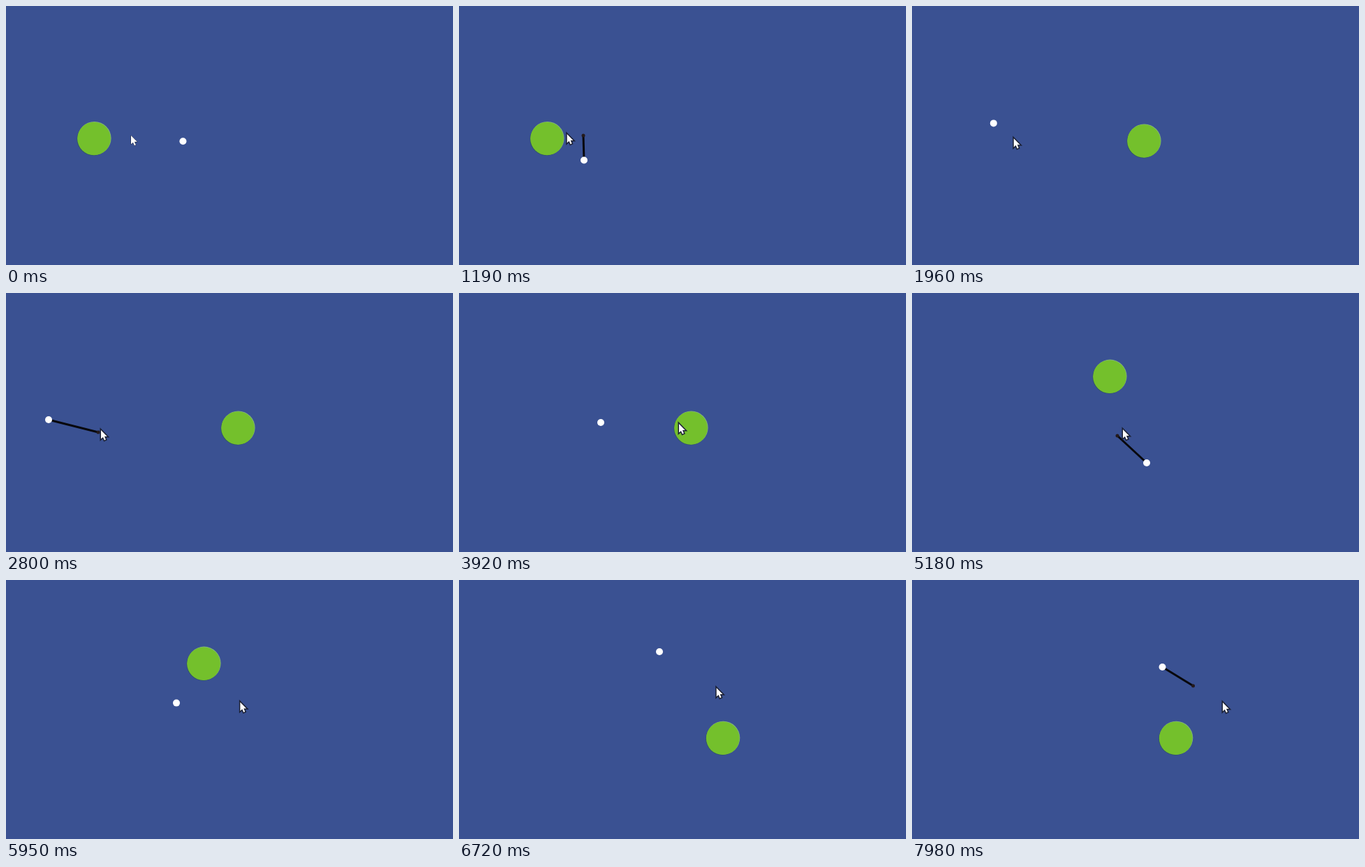
These frames come from a looping animation (640 by 372 pixels, 8 s). An HTML page with a canvas:

```html
<!DOCTYPE html>
<html lang="en">
<head>
<meta charset="utf-8">
<title>Swing ball</title>
<style>
  html, body { margin: 0; width: 100%; height: 100%; overflow: hidden; background: #3a5192; }
  canvas { display: block; }
</style>
</head>
<body>
<canvas id="stage" width="640" height="372"></canvas>
<script>
const ctx = document.getElementById('stage').getContext('2d');
const LOOP = 8000, STEP = 70;
const GRAVITY = 1.115e-4; // px per ms²

const key = (t, x, y, rope) => ({ t, x, y, rope });
const point = (x, y) => ({ x, y });
const first = point(178, 186), second = point(132, 200),
      third = point(294, 205), fourth = point(402.5, 152);

// Each key starts a leg: a swing when it names a rope's anchor, else free flight.
const ballKeys = [
  key(0, 253.4, 194.2),
  key(840, 214, 228, first), key(1190, 179, 221.5, first),
  key(1400, 154, 203),
  key(2800, 61, 182, second),
  key(3560, 144, 229),
  key(3920, 203, 186),
  key(4300, 265.5, 155.5, third), key(5180, 336, 244, third),
  key(5950, 244, 176.6),
  key(6720, 287, 103),
  key(7700, 342.6, 105, fourth), key(7980, 358.5, 125, fourth)
];
const cursorKeys = [
  key(0, 179, 186), key(840, 178, 186), key(1190, 154.7, 184),
  key(2800, 136, 197), key(3920, 315, 188), key(5180, 302, 196),
  key(6720, 368.7, 155), key(7980, 445, 176)
];
const goals = [
  key(0, 126, 190.5), key(1470, 332, 194), key(4690, 283, 120.2), key(6230, 377.7, 227.3)
];

const mix = (a, b, u) => a + (b - a) * u;
const latest = (keys, t) => keys.findLastIndex(k => k.t <= t);

// Angle and distance from the anchor both change evenly.
function swing(a, b, u) {
  const polar = p => [Math.atan2(p.y - a.rope.y, p.x - a.rope.x),
                      Math.hypot(p.x - a.rope.x, p.y - a.rope.y)];
  const [from, r0] = polar(a), [to, r1] = polar(b);
  const turn = Math.atan2(Math.sin(to - from), Math.cos(to - from));
  const angle = from + turn * u, r = mix(r0, r1, u);
  return point(a.rope.x + r * Math.cos(angle), a.rope.y + r * Math.sin(angle));
}

function pointAt(keys, t, gravity = 0) {
  const i = latest(keys, t), a = keys[i], b = keys[i + 1];
  if (!b) return a;
  const u = (t - a.t) / (b.t - a.t);
  if (a.rope) return swing(a, b, u);
  const lift = gravity / 2 * (t - a.t) * (b.t - t);
  return point(mix(a.x, b.x, u), mix(a.y, b.y, u) - lift);
}

function disc({ x, y }, radius, color, dx = 0, dy = 0) {
  ctx.fillStyle = color;
  ctx.beginPath();
  ctx.arc(x + dx, y + dy, radius, 0, Math.PI * 2);
  ctx.fill();
}

function drawGoal(goal) {
  disc(goal, 24, '#31566a', -0.6, 0.6);
  disc(goal, 24, '#7fb27a', 0.6, -0.6);
  disc(goal, 23.8, '#74c02c');
}

function drawRope(anchor, ball) {
  ctx.strokeStyle = '#08080c';
  ctx.lineWidth = 3;
  ctx.beginPath();
  ctx.moveTo(anchor.x, anchor.y);
  ctx.lineTo(ball.x, ball.y);
  ctx.stroke();
  disc(anchor, 2.5, '#241a1c');
}

const arrow = new Path2D('M0 0V12.6L2.9 9.9L4.9 14.5L6.9 13.6L5 9.1H8.8Z');
function drawCursor({ x, y }) {
  ctx.save();
  ctx.translate(x, y);
  ctx.fillStyle = '#fff';
  ctx.strokeStyle = '#1b2033';
  ctx.stroke(arrow);
  ctx.fill(arrow);
  ctx.restore();
}

function draw(t) {
  const ball = pointAt(ballKeys, t, GRAVITY);
  const { rope } = ballKeys[latest(ballKeys, t)];

  ctx.fillStyle = '#3a5192';
  ctx.fillRect(0, 0, 640, 372);
  drawGoal(goals[latest(goals, t)]);
  if (rope) drawRope(rope, ball);
  disc(ball, 5, '#fff');
  drawCursor(pointAt(cursorKeys, t));
}

function tick() {
  const t = performance.now() % LOOP;
  draw(Math.floor(t / STEP) * STEP);
  requestAnimationFrame(tick);
}
tick();
</script>
</body>
</html>
```
